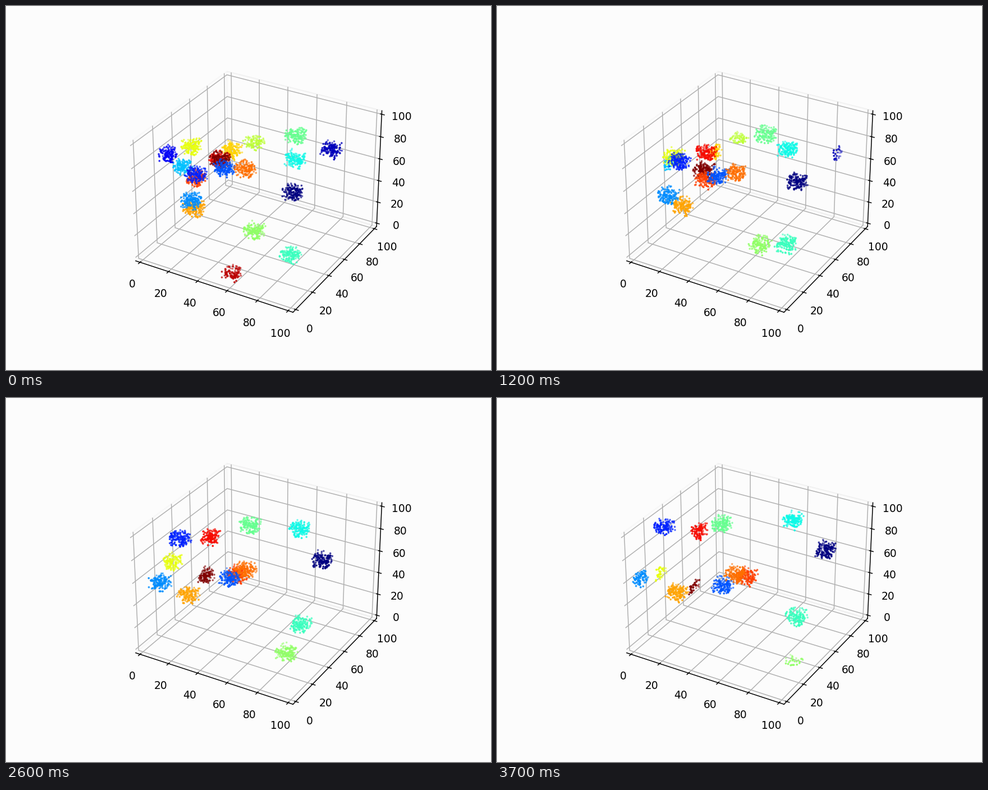
Write a matplotlib script that moves like this. It is 864 px wide and 648 px high and loops after 3.8 s.

```python
import matplotlib.pyplot as plt
import numpy as np
from matplotlib.animation import FuncAnimation

FRAMES = 38
POINTS = 150
HALF = 5  # half the side of each cubic swarm
PAPER = "#fcfcfc"
MARGIN = 3.125

fig = plt.figure(figsize=(6.4, 4.8), dpi=135, facecolor=PAPER)
ax = fig.add_subplot(projection="3d", facecolor=PAPER)
limits = (-MARGIN, 100 + MARGIN)
ax.set(xlim=limits, ylim=limits, zlim=limits)
for axis in (ax.xaxis, ax.yaxis, ax.zaxis):
    axis.pane.set_fill(False)
fig.canvas.draw()

projection = ax.get_proj()
to_view = ax.transData.inverted()


def locate(px, py, y):
    """Data position that appears at stage pixel (px, py) with depth y."""
    view = to_view.transform((px, 648 - py))
    rows = projection[:2] - np.outer(view, projection[3])
    x, z = np.linalg.solve(rows[:, [0, 2]], -rows[:, 1] * y - rows[:, 3])
    return np.array([x, y, z])


# Each swarm drifts steadily: first pixel, last pixel, depth along y.
drifts = [
    ((510, 332), (586, 270), 70), ((579, 255), (706, 286), 66),
    ((288, 262), (192, 181), 24), ((338, 300), (298, 228), 25),
    ((390, 288), (402, 333), 40), ((331, 346), (251, 320), 6),
    ((313, 285), (275, 259), 39), ((515, 273), (527, 217), 80),
    ((507, 441), (533, 388), 35), ((517, 231), (400, 224), 75),
    ((442, 400), (525, 476), 34), ((442, 240), (409, 206), 40),
    ((331, 249), (282, 308), 29), ((402, 256), (348, 260), 91),
    ((336, 359), (320, 346), 8), ((426, 290), (426, 313), 30),
    ((338, 306), (445, 317), 50), ((380, 273), (357, 236), 70),
    ((403, 478), (440, 545), 8), ((382, 273), (342, 333), 66),
]
swarms = [(locate(*first, y), locate(*last, y)) for first, last, y in drifts]
colors = plt.get_cmap("jet")(np.linspace(0, 1, len(swarms)))
clouds = []


def draw(frame):
    rng = np.random.default_rng(frame)
    progress = frame / (FRAMES - 1)
    while clouds:
        clouds.pop().remove()
    for (first, last), color in zip(swarms, colors):
        center = first + (last - first) * progress
        points = center + rng.uniform(-HALF, HALF, (POINTS, 3))
        # Points that leave the box vanish.
        points = points[((points >= 0) & (points <= 100)).all(axis=1)]
        if len(points):
            clouds.append(ax.scatter(*points.T, color=color, s=1))
    return clouds


animation = FuncAnimation(fig, draw, frames=FRAMES, init_func=lambda: draw(0),
                          interval=100, repeat=True, repeat_delay=0)
plt.show()
```
